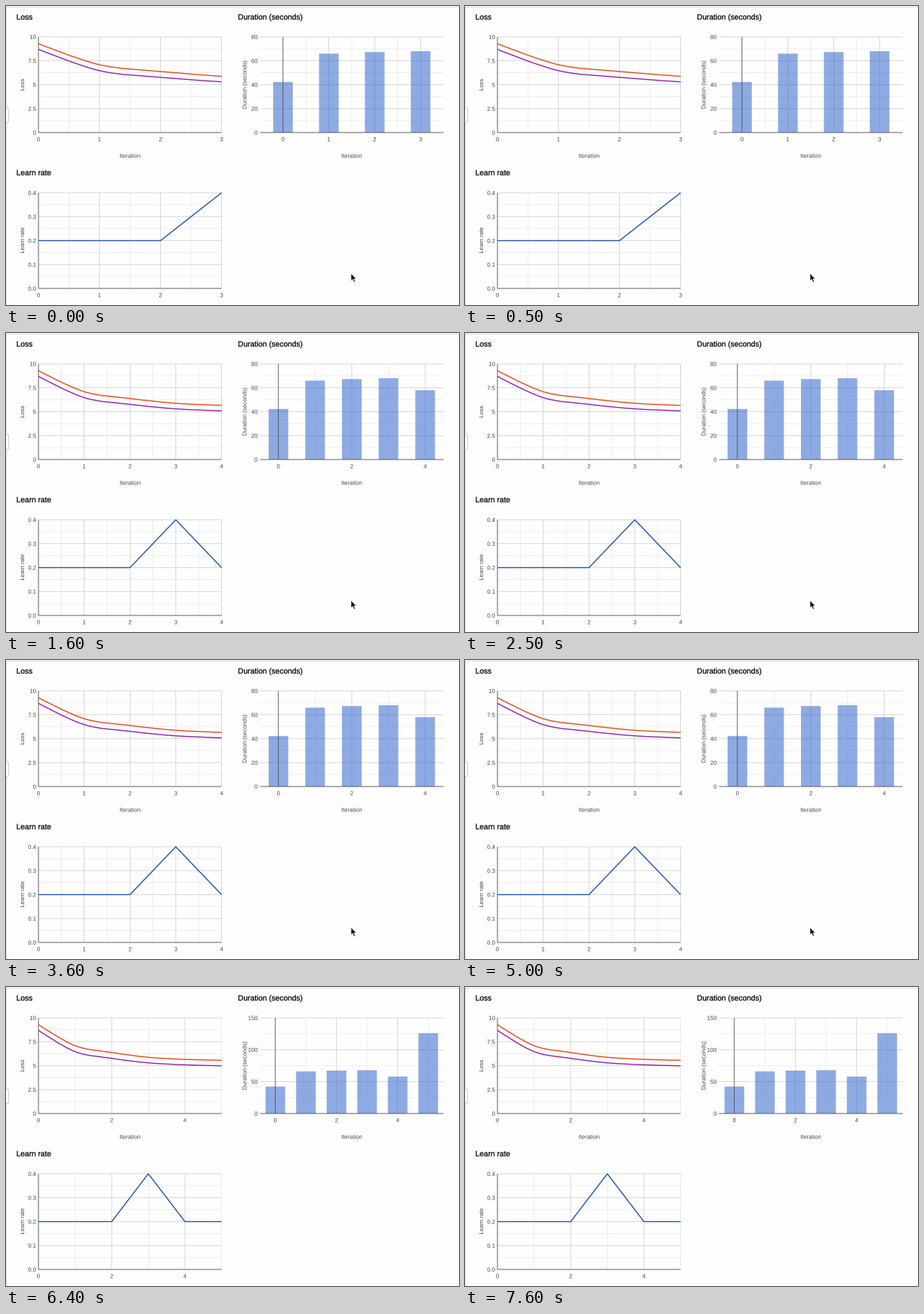
These frames come from a looping animation (600 by 397 pixels, 8000 ms). A matplotlib script:

```python
import matplotlib.pyplot as plt
from matplotlib.animation import FuncAnimation
from matplotlib.patches import FancyBboxPatch, PathPatch, Polygon, Rectangle
from matplotlib.path import Path
from matplotlib.textpath import TextPath
from matplotlib.transforms import Affine2D

plt.rcParams.update({"font.family": "Liberation Sans", "path.snap": False})

W, H, DPI = 600, 397, 100
PX = 72 / DPI  # points per pixel
INTERVAL, FRAMES = 100, 80

MAJOR, MINOR, AXIS, LABEL = "#cccccc", "#ebebeb", "#4d4d4d", "#444444"
ORANGE, PURPLE, BLUE, BAR = "#e64a19", "#8e24aa", "#2254b4", "#3366cc"

LOSSES = [
    ([9.29, 7.09, 6.38, 5.88, 5.66, 5.57], ORANGE),
    ([8.70, 6.47, 5.77, 5.30, 5.09, 4.99], PURPLE),
]
RATES = [0.2, 0.2, 0.2, 0.4, 0.2, 0.2]
DURATIONS = [42.3, 66, 67.3, 68, 58, 126]

fig = plt.figure(figsize=(W / DPI, H / DPI), dpi=DPI, facecolor="#fefefe")
ax = fig.add_axes([0, 0, 1, 1])
ax.set_xlim(0, W)
ax.set_ylim(H, 0)
ax.axis("off")


def text(x, y, s, size=7.65, color=LABEL, align=0.5, rotation=0, weight=0.0):
    """Text as outlines for subpixel layout; align is 0 left to 1 right."""
    outline = TextPath((0, 0), s, size=size)
    box = outline.get_extents()
    place = (Affine2D().translate(-box.x0 - align * box.width, 0)
             .scale(1, -1).rotate_deg(-rotation).translate(x, y))
    return ax.add_patch(PathPatch(place.transform_path(outline), fc=color,
                                  ec=color, lw=weight * PX, zorder=6))


def line(xs, ys, color, width=0.75, z=1):
    return ax.plot(xs, ys, color=color, lw=width * PX, zorder=z,
                   solid_capstyle="butt")[0]


def smooth(points, color):
    """Bezier curve with central-difference tangents and free ends."""
    tangents = [(0, 0)]
    for (x0, y0), (x1, y1) in zip(points, points[2:]):
        tangents.append(((x1 - x0) / 6, (y1 - y0) / 6))
    tangents.append((0, 0))
    verts = [points[0]]
    for i in range(len(points) - 1):
        (xa, ya), (xb, yb) = points[i], points[i + 1]
        (ua, va), (ub, vb) = tangents[i], tangents[i + 1]
        verts += [(xa + ua, ya + va), (xb - ub, yb - vb), (xb, yb)]
    codes = [Path.MOVETO] + [Path.CURVE4] * (len(verts) - 1)
    return ax.add_patch(PathPatch(Path(verts, codes), fc="none", ec=color,
                                  lw=1.4 * PX, zorder=4))


class Panel:
    """Plot area with pixel bounds, a y scale and gridlines."""

    def __init__(self, left, right, top, bottom, y_max):
        self.left, self.right = left, right
        self.top, self.bottom, self.y_max = top, bottom, y_max
        self.artists = []

    def y(self, value):
        return self.bottom - value / self.y_max * (self.bottom - self.top)

    def vertical(self, x, color, z=1):
        self.artists.append(line([x, x], [self.top, self.bottom], color, z=z))

    def horizontal(self, y, color, z=1):
        self.artists.append(line([self.left, self.right], [y, y], color, z=z))

    def y_axis(self, labels):
        steps = len(labels) - 1
        gap = (self.bottom - self.top) / steps
        for i, label in enumerate(labels):
            y = self.bottom - i * gap
            if i < steps:
                self.horizontal(y - gap / 2, MINOR)
            self.horizontal(y, MAJOR, 2)
            self.artists.append(text(self.left - 3.4, y + 2.8, label, align=1))
        self.horizontal(self.bottom, AXIS, 5)

    def x_axis(self, xs):
        """Label every category, or every other one when there are too many."""
        step = 1 if len(xs) <= self.max_labels else 2
        for i, x in enumerate(xs):
            if i % step:
                self.vertical(x, MINOR)
                continue
            self.vertical(x, MAJOR, 2)
            self.artists.append(text(x, self.bottom + 11.5, str(i)))
            if step == 1 and i + 1 < len(xs):
                self.vertical((x + xs[i + 1]) / 2, MINOR)
        self.vertical(xs[0], AXIS, 5)


class LinePanel(Panel):
    max_labels = 5

    def positions(self, count):
        return [self.left + i * (self.right - self.left) / (count - 1)
                for i in range(count)]


class BarPanel(Panel):
    max_labels = 4

    def positions(self, count):
        slot = (self.right - self.left) / count
        return [self.left + (i + 0.5) * slot for i in range(count)]


def build_charts(count):
    loss = LinePanel(43, 285.5, 41, 168, 10)
    xs = loss.positions(count)
    loss.y_axis(["0", "2.5", "5", "7.5", "10"])
    loss.x_axis(xs)
    for values, color in LOSSES:
        points = [(x, loss.y(v)) for x, v in zip(xs, values)]
        loss.artists.append(smooth(points, color))

    rate = LinePanel(43, 285.5, 248, 375, 0.4)
    rate.y_axis(["0.0", "0.1", "0.2", "0.3", "0.4"])
    rate.x_axis(xs)
    ys = [rate.y(v) for v in RATES[:count]]
    rate.artists.append(line(xs, ys, BLUE, 1.4, 6))

    values = DURATIONS[:count]
    top, step = (80, 20) if max(values) <= 80 else (150, 50)
    duration = BarPanel(336.5, 579.5, 41, 168, top)
    xs = duration.positions(count)
    duration.y_axis([str(v) for v in range(0, top + 1, step)])
    duration.x_axis(xs)
    for x, v in zip(xs, values):
        y = duration.y(v)
        duration.artists.append(ax.add_patch(Rectangle(
            (x - 13, y), 26, duration.bottom - y, fc=BAR, alpha=0.55,
            lw=0, zorder=3)))
    return loss.artists + rate.artists + duration.artists


def build_page():
    line([0, W], [1.5, 1.5], "#dcdcdc", 1)
    line([0.5, 0.5], [1, H], "#dcdcdc", 1)
    ax.add_patch(FancyBboxPatch((-4, 136), 7, 18, fc="#fbfbfb", ec="#cfcfcf",
                                boxstyle="round,pad=0.5,rounding_size=1.5",
                                lw=PX, zorder=2))
    for x, y, title in [(14.5, 18, "Loss"), (308, 18, "Duration (seconds)"),
                        (14.5, 224.7, "Learn rate")]:
        text(x, y, title, 10.15, "black", align=0, weight=0.25)
    for x in (164.5, 458):
        text(x, 201.5, "Iteration")
    for x, y, label in [(24, 104.5, "Loss"), (318.5, 104.5, "Duration (seconds)"),
                        (24, 311, "Learn rate")]:
        text(x, y, label, rotation=90)


build_page()
charts = {count: build_charts(count) for count in (4, 5, 6)}
pointer = ax.add_patch(Polygon(
    [(457, 355), (457, 365), (459.2, 363), (460.9, 367), (462.6, 366.2),
     (460.9, 362.4), (463.8, 362.2)],
    fc="#111111", ec="white", lw=0.6 * PX, zorder=8))


def update(frame):
    ms = frame * INTERVAL
    shown = 4 if ms < 1600 else 5 if ms < 5100 else 6
    for count, artists in charts.items():
        for artist in artists:
            artist.set_visible(count == shown)
    pointer.set_visible(shown < 6)
    return []


anim = FuncAnimation(fig, update, frames=FRAMES, interval=INTERVAL,
                     repeat=True, repeat_delay=0, init_func=lambda: update(0))
plt.show()
```
